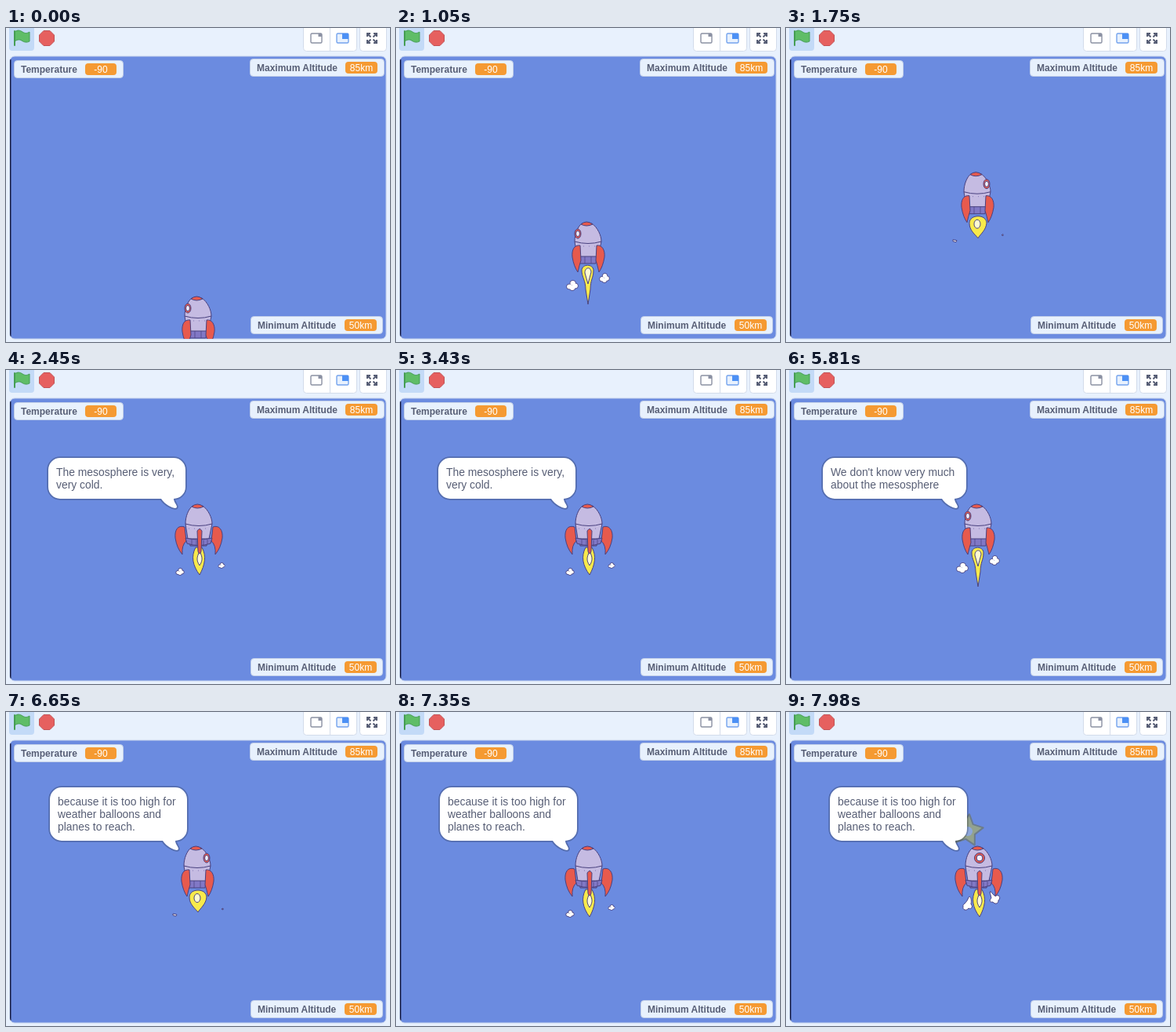
An HTML page for the animation above (8000 ms loop, 490 by 400 pixels).

```html
<!DOCTYPE html>
<html lang="en">
<head>
<meta charset="utf-8">
<title>Mesosphere rocket</title>
<style>
html, body { margin: 0; width: 100%; height: 100%; overflow: hidden; background: #e8f1fd; }
svg { display: block; width: 490px; height: 400px; }
text { font-family: "Liberation Sans", Arial, sans-serif; fill: #575e75; }
.label { font-size: 12px; font-weight: bold; }
.value { font-size: 12px; fill: #fff; text-anchor: middle; }
.say { font-size: 13.9px; }
.ink { stroke: #49417f; stroke-width: 1; stroke-linejoin: round; }
</style>
</head>
<body>
<svg id="scene" viewBox="0 0 490 400">
  <defs>
    <clipPath id="stageClip"><rect x="5" y="36" width="480" height="360" rx="6"/></clipPath>
  </defs>
  <rect width="490" height="400" fill="#e8f1fd"/>

  <rect x="4" y="-6" width="32" height="35" rx="4" fill="#c3daf7"/>
  <path d="M11 5C15 2 18 3 21 5S27 7 30 5V17C26 19 23 18 20 16S14 15 11 17Z" fill="#5fbd68" stroke="#459d54"/>
  <path d="M11 4V22" stroke="#459d54" stroke-width="2" stroke-linecap="round"/>
  <path d="M48 3.5H56L61.5 9V17L56 22.5H48L42.5 17V9Z" fill="#e6605f" stroke="#c15357"/>

  <g fill="#fff" stroke="#d3dceb">
    <rect x="379.500" y="-5" width="68" height="34.500" rx="4"/>
    <rect x="451.500" y="-5" width="34" height="34.500" rx="4"/>
    <path d="M413.500 0V29"/>
  </g>
  <rect x="389" y="7" width="14" height="12" rx="1.500" fill="#fff" stroke="#8b91a3" stroke-width="1.400"/>
  <path d="M398.500 7H403V11H398.500Z" fill="#8b91a3"/>
  <rect x="422" y="7" width="15" height="12" rx="1.500" fill="#e8f1fd" stroke="#74a3ed" stroke-width="1.400"/>
  <path d="M429 7H437V14H429Z" fill="#4c90f5"/>
  <g stroke="#575e75" stroke-width="2" fill="none">
    <path d="M461 11V7H465M469 7H473V11M473 15V19H469M465 19H461V15M461 7L465.500 11.500M473 7L468.500 11.500M473 19L468.500 14.500M461 19L465.500 14.500"/>
  </g>

  <rect x="5" y="36" width="480" height="360" rx="6" fill="#6b8be0" stroke="#c2d0ec"/>
  <g clip-path="url(#stageClip)">
    <path d="M5.700 40V393" stroke="#14183d" stroke-width="1.500"/>
    <g id="star" opacity=".55"></g>
    <g id="rocket"></g>
    <g id="bubbles"></g>
  </g>
  <g id="monitors"></g>
</svg>
<script>
const LOOP = 8000, STEP = 70, SPIN = 960;
const START_Y = 342, END_Y = 171, RISE = 1890;
const byId = id => document.getElementById(id);

const monitor = (x, y, w, label, value, pillX, pillW = 41) => `
  <rect x="${x + .5}" y="${y + .5}" width="${w - 1}" height="22" rx="4" fill="#e8f1fd" stroke="#c3d0e8"/>
  <text class="label" x="${x + 9}" y="${y + 16}">${label}</text>
  <rect x="${pillX}" y="${y + 4}" width="${pillW}" height="15" rx="4" fill="#f59a32"/>
  <text class="value" x="${pillX + pillW / 2}" y="${y + 15.6}">${value}</text>`;

byId("monitors").innerHTML =
  monitor(10, 41, 140, "Temperature", "-90", 101, 40) +
  monitor(311, 39, 172, "Maximum Altitude", "85km", 433) +
  monitor(312, 367, 169, "Minimum Altitude", "50km", 432);

// Speech bubble with its tail at the lower right
function bubble(left, top, right, lines) {
  const bottom = 164, r = 15;
  const shape = `M${left + r} ${top}H${right - r}A${r} ${r} 0 0 1 ${right} ${top + r}
    V${bottom - r}A${r} ${r} 0 0 1 ${right - r} ${bottom}
    c0 4 4 8 4 10q0 2 -2 2c-3 0 -13 -4 -18 -12H${left + r}
    A${r} ${r} 0 0 1 ${left} ${bottom - r}V${top + r}A${r} ${r} 0 0 1 ${left + r} ${top}Z`;
  const text = lines.map((s, i) =>
    `<text class="say" x="${left + 10}" y="${top + 23 + i * 15.8}">${s}</text>`).join("");
  return `<g><path d="${shape}" fill="none" stroke="#000" stroke-opacity=".22" stroke-width="3.500"/>
    <path d="${shape}" fill="#fff"/>${text}</g>`;
}

byId("bubbles").innerHTML =
  bubble(54, 112, 229, ["The mesosphere is very,", "very cold."]) +
  bubble(47, 112, 230, ["We don't know very much", "about the mesosphere"]) +
  bubble(56, 96, 231, ["because it is too high for", "weather balloons and", "planes to reach."]);

const RED = "#e75a4d", BODY = "#c5bbe2", BAND = "#8178c6", YELLOW = "#f8ea4b", CREAM = "#fffbd2";
const ink = (d, fill) => `<path class="ink" d="${d}" fill="${fill}"/>`;

const hull = ink("M-12 43H11L10 53H-11Z", BAND) +
  ink("M-17 25L-14 44H13L17 25Z", BODY) +
  ink("M-17 25C-17 15 -13 6 -8 2Q-2 -1 5 2C12 7 17 17 17 25Q0 30 -17 25Z", BODY) +
  ink("M-9 3Q-2 -3 6 3Q-2 7 -9 3Z", RED) +
  `<path d="M-13 31H13" stroke="#8379b5" stroke-dasharray="1 6"/>`;

const sideFins = ink("M-10 30C-18 29 -21 36 -20 45Q-18 57 -13 64Q-11 55 -9 49Z", RED) +
  ink("M11 30C18 29 22 36 21 45Q19 57 14 64Q12 55 10 49Z", RED) +
  `<path d="M-4 44V53M4 44V53" stroke="#49417f" stroke-width=".7"/>`;

const wideFins = ink("M-17 29C-26 26 -30 33 -29 43Q-27 56 -20 64Q-21 52 -15 47Z", RED) +
  ink("M19 29C27 26 32 33 31 43Q29 56 22 64Q23 52 17 47Z", RED);
const frontBase = ink("M-16 43Q1 47 18 43L16 50Q1 55 -14 50Z", BAND) +
  `<path d="M-8 45V52M-2 46V53M7 46V53M12 45V51" stroke="#49417f" stroke-width=".7"/>`;
const frontFin = ink("M-1 34Q2 29 5 34L4 60Q2 66 0 60Z", RED);

const porthole = (x, y, rx, ry) =>
  `<ellipse class="ink" cx="${x}" cy="${y}" rx="${rx}" ry="${ry}" fill="${RED}"/>
   <ellipse class="ink" cx="${x}" cy="${y}" rx="${rx * .6}" ry="${ry * .6}" fill="#f5f1fa"/>`;

// Cloud puff made of overlapping lobes
function puff(x, y, w, h) {
  const lobes = [[-.28, .12], [.05, -.25], [.28, .05], [0, .25]];
  const draw = attrs => lobes.map(([u, v]) =>
    `<ellipse cx="${x + u * w}" cy="${y + v * h}" rx="${w * .25}" ry="${h * .25}" ${attrs}/>`).join("");
  return draw('fill="#fff" stroke="#49417f" stroke-width="1.500"') + draw('fill="#fff"');
}

const longFlame = ink("M-8 62C-8 53 7 53 7 62C7 71 3 74 3 86L0 105L-3 86C-3 75 -8 70 -8 62Z", YELLOW) +
  ink("M-4 65C-4 57 4 57 4 64Q2 71 0 79Q-2 72 -4 65Z", CREAM);
const leafFlame = ink("M-3 55H5C11 66 9 77 2 90C-7 78 -9 66 -3 55Z", YELLOW) +
  ink("M2 60C7 69 5 73 2 78C-2 72 -2 68 2 60Z", CREAM);
const dropFlame = ink("M-10 65C-10 53 12 53 12 65C11 74 4 79 1 84C-3 79 -10 74 -10 65Z", YELLOW) +
  `<ellipse class="ink" cx="0" cy="66" rx="4" ry="5.500" fill="${CREAM}"/>`;

const heartPuffs = ink("M-12 65C-9 62 -8 69 -9 74C-6 76 -8 81 -12 79C-15 83 -20 81 -19 77C-20 73 -15 74 -12 65Z", "#fff") +
  ink("M15 58C18 57 18 63 23 63C28 61 29 67 26 69C26 74 21 74 19 71C14 72 15 68 17 66Z", "#fff");
const specks = ink("M-32 86L-27 87L-28 89L-32 88Z", "#fff") + ink("M30 80L32 79V81Z", "#fff");

// Four views of the turning rocket, drawn around its nose
const views = [
  longFlame + puff(-20, 81, 13, 12) + puff(21, 71.500, 11, 11) + hull + porthole(-13, 15, 4, 6) + sideFins,
  leafFlame + heartPuffs + `<g transform="translate(1)">${hull}</g>` + wideFins + frontBase +
    porthole(2, 15, 6.500, 6.500) + frontFin,
  leafFlame + puff(-23, 86, 9, 8) + puff(30, 78, 7, 6) + `<g transform="translate(1)">${hull}</g>` +
    wideFins + frontBase + frontFin,
  `<g transform="translate(-1)">${dropFlame}${hull}${porthole(12, 15, 4, 6)}${sideFins}</g>` + specks
];
byId("rocket").innerHTML = views.map(v => `<g>${v}</g>`).join("");

function starPath(cx, cy, outer, inner, tilt) {
  const pts = Array.from({ length: 10 }, (_, i) => {
    const a = tilt + i * Math.PI / 5, r = i % 2 ? inner : outer;
    return `${(cx + r * Math.cos(a)).toFixed(1)} ${(cy + r * Math.sin(a)).toFixed(1)}`;
  });
  return `M${pts.join("L")}Z`;
}
byId("star").innerHTML =
  `<path d="${starPath(231, 151, 21, 11, -.17)}" fill="#b4b64c" stroke="#6d7048" stroke-width="2" stroke-linejoin="round"/>
   <circle cx="232" cy="152" r="6" fill="#a9bfd8"/>`;

const says = [[1900, 3930], [3930, 5950], [5950, LOOP]];
const show = (el, on) => el.setAttribute("visibility", on ? "visible" : "hidden");

function render(time) {
  const t = Math.floor(time % LOOP / STEP) * STEP;
  const y = START_Y + (END_Y - START_Y) * Math.min(1, t / RISE);
  const view = Math.floor((t + 48) % SPIN / SPIN * views.length);
  byId("rocket").setAttribute("transform", `translate(245 ${y.toFixed(1)})`);
  [...byId("rocket").children].forEach((el, i) => show(el, i === view));
  [...byId("bubbles").children].forEach((el, i) => show(el, t >= says[i][0] && t < says[i][1]));
  show(byId("star"), t >= 7910);
}

const begin = performance.now();
function tick() {
  render(performance.now() - begin);
  requestAnimationFrame(tick);
}
tick();
</script>
</body>
</html>
```
